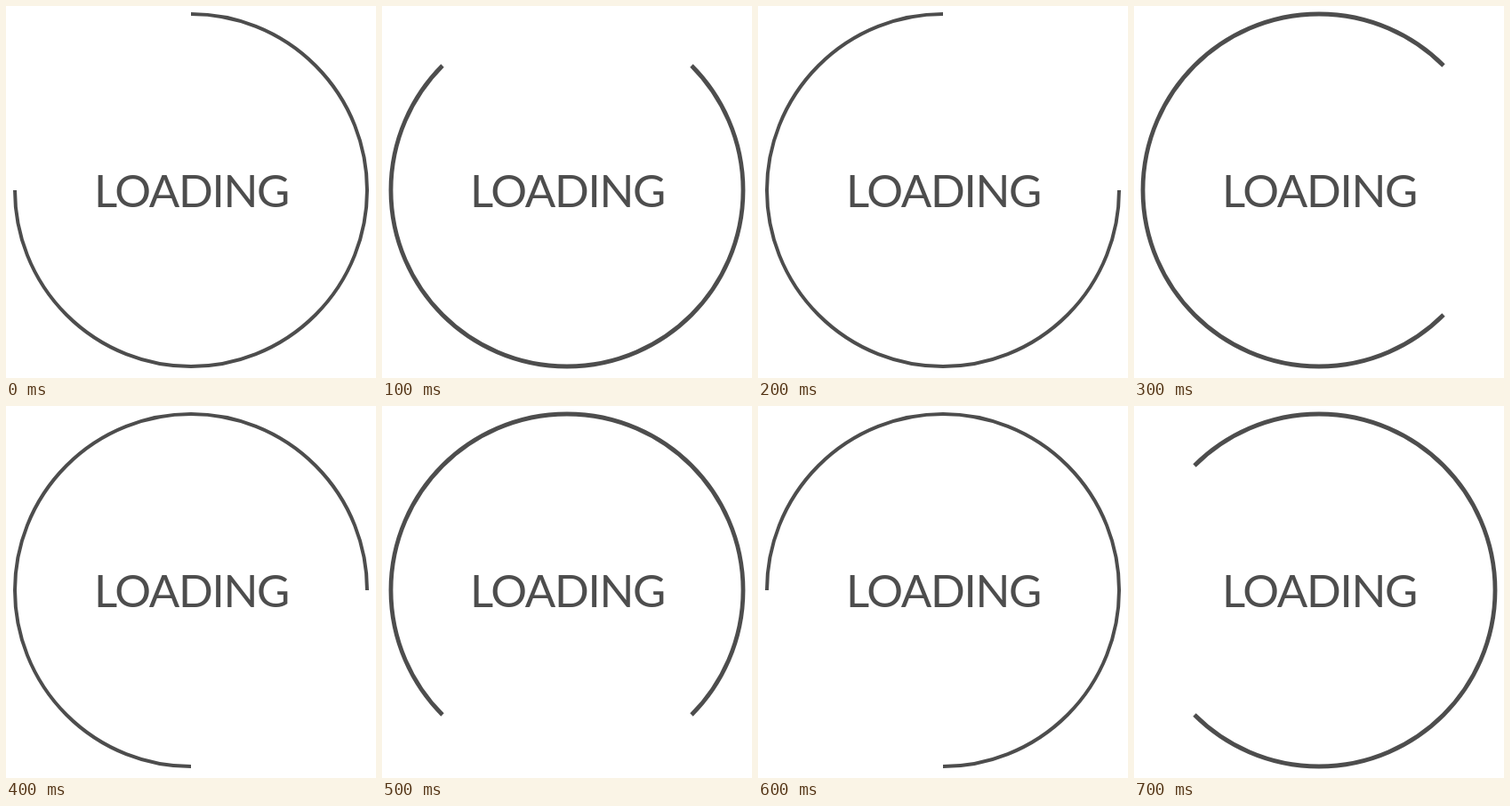
An HTML page with a canvas for the animation above (800 ms loop, 416 by 418 pixels).

```html
<!DOCTYPE html>
<html lang="en">
<head>
<meta charset="utf-8">
<title>Loading</title>
<style>
  html, body { margin: 0; width: 100%; height: 100%; overflow: hidden; background: #fff; }
  canvas { display: block; }
</style>
</head>
<body>
<canvas id="stage" width="416" height="418"></canvas>
<script>
const ctx = document.getElementById('stage').getContext('2d');
const INK = '#4d4d4d';
const CX = 208, CY = 207, RADIUS = 198;
const STEP_MS = 100, STEPS = 8;

function drawRing(step) {
  // A quarter-turn gap that advances an eighth of a turn per step.
  const start = -Math.PI / 2 + step * Math.PI / 4;
  ctx.strokeStyle = INK;
  ctx.lineWidth = step % 2 ? 4.8 : 4;
  ctx.beginPath();
  ctx.arc(CX, CY, RADIUS, start, start + Math.PI * 1.5);
  ctx.stroke();
}

function drawLabel() {
  ctx.fillStyle = INK;
  ctx.font = '400 51px Lato, "Open Sans", sans-serif';
  ctx.letterSpacing = '-1.3px';
  ctx.textBaseline = 'alphabetic';
  ctx.fillText('LOADING', 99, 225.5);
}

function frame(now) {
  const step = Math.floor(now / STEP_MS) % STEPS;
  ctx.fillStyle = '#fff';
  ctx.fillRect(0, 0, 416, 418);
  drawRing(step);
  drawLabel();
  requestAnimationFrame(frame);
}

frame(0);
</script>
</body>
</html>
```
